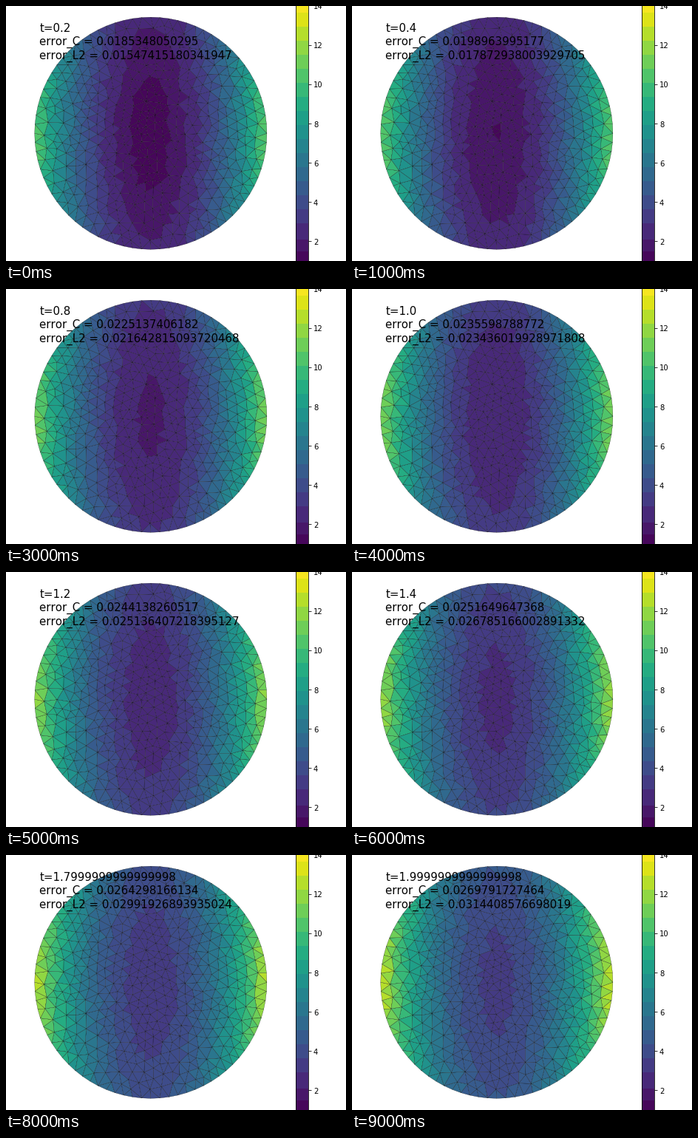
Write a matplotlib script that moves like this. It is 460 px wide and 345 px high and loops after 10000 ms.

```python
from itertools import accumulate

import matplotlib.pyplot as plt
import numpy as np
from matplotlib.animation import FuncAnimation
from matplotlib.colors import BoundaryNorm, ListedColormap
from matplotlib.transforms import ScaledTranslation
from matplotlib.tri import Triangulation

W, H, DPI = 460, 345, 72
SIDE = 345.6          # side of the square plot area, slightly taller than the stage

plt.rcParams["font.family"] = "DejaVu Sans"
plt.rcParams["text.kerning_factor"] = 6   # kerning in whole pixels

TIMES = list(accumulate([0.2] * 10))
ERR_C = ["0.0185348050295", "0.0198963995177", "0.0213199314033",
         "0.0225137406182", "0.0235598788772", "0.0244138260517",
         "0.0251649647368", "0.0258390174263", "0.0264298166134",
         "0.0269791727464"]
ERR_L2 = ["0.01547415180341947", "0.017872938003929705", "0.01979797717173244",
          "0.021642815093720468", "0.023436019928971808", "0.025136407218395127",
          "0.026785166002891332", "0.02837150462918053", "0.02991926893935024",
          "0.0314408576698019"]


def disk_mesh(rim_count=80, darts=9000, seed=7):
    """Unstructured triangle mesh of the unit disk, a little finer inside."""
    rng = np.random.default_rng(seed)
    angle = 2 * np.pi * np.arange(rim_count) / rim_count
    pts = np.column_stack([np.cos(angle), np.sin(angle)])
    for _ in range(darts):
        r, a = 0.955 * np.sqrt(rng.random()), 2 * np.pi * rng.random()
        p = np.array([r * np.cos(a), r * np.sin(a)])
        gap = 0.056 + 0.015 * r
        if np.min(np.sum((pts - p) ** 2, axis=1)) > gap ** 2:
            pts = np.vstack([pts, p])
    for _ in range(2):
        i, j = Triangulation(*pts.T).edges.T
        total, degree = np.zeros_like(pts), np.zeros(len(pts))
        for a, b in ((i, j), (j, i)):
            np.add.at(total, a, pts[b])
            np.add.at(degree, a, 1)
        mean = total / degree[:, None]
        pts[rim_count:] += 0.6 * (mean - pts)[rim_count:]
    return Triangulation(*pts.T)


def place(x, y, w, h):
    """Axes given in pixels from the lower left corner."""
    return fig.add_axes([x / W, y / H, w / W, h / H])


def label(y):
    return fig.text(45.4 / W, 1 - y / H, "", fontsize=15, va="baseline")


mesh = disk_mesh()
shape = (9.6 * mesh.x ** 2 + mesh.y ** 2)[mesh.triangles].mean(axis=1)


def solution(t):
    return 1 + shape + 1.2 * t


# Banded viridis
bounds = np.concatenate([[1, 1.5, 2.1], np.linspace(2.9, 13.65, 16), [14]])
mids = (bounds[:-1] + bounds[1:]) / 2
cmap = ListedColormap(plt.get_cmap("viridis")((mids - 1) / 13))
norm = BoundaryNorm(bounds, cmap.N)

fig = plt.figure(figsize=(W / DPI, H / DPI), dpi=DPI, facecolor="white")
ax = place(23.04, 0, SIDE, SIDE)
ax.axis("off")
faces = ax.tripcolor(mesh, facecolors=solution(TIMES[0]), cmap=cmap, norm=norm,
                     edgecolors="k", linewidth=0.25)
ax.set(xlim=(-1.1, 1.1), ylim=(-1.1, 1.1))

cax = place(391.68, 0, SIDE / 20, SIDE)
bar = fig.colorbar(faces, cax=cax, spacing="proportional", ticks=range(2, 15, 2))
bar.minorticks_off()

# Tick labels sit a fraction of a pixel below their marks
drop = ScaledTranslation(0, (H - SIDE) / DPI, fig.dpi_scale_trans)
for tick in cax.get_yticklabels():
    tick.set_transform(tick.get_transform() + drop)

labels = [label(y) for y in (35, 53, 72)]


def update(k):
    faces.set_array(solution(TIMES[k]))
    lines = (f"t={TIMES[k]}", f"error_C = {ERR_C[k]}", f"error_L2 = {ERR_L2[k]}")
    for text, line in zip(labels, lines):
        text.set_text(line)
    return [faces, *labels]


anim = FuncAnimation(fig, update, frames=len(TIMES), interval=1000, repeat=True)
plt.show()
```
